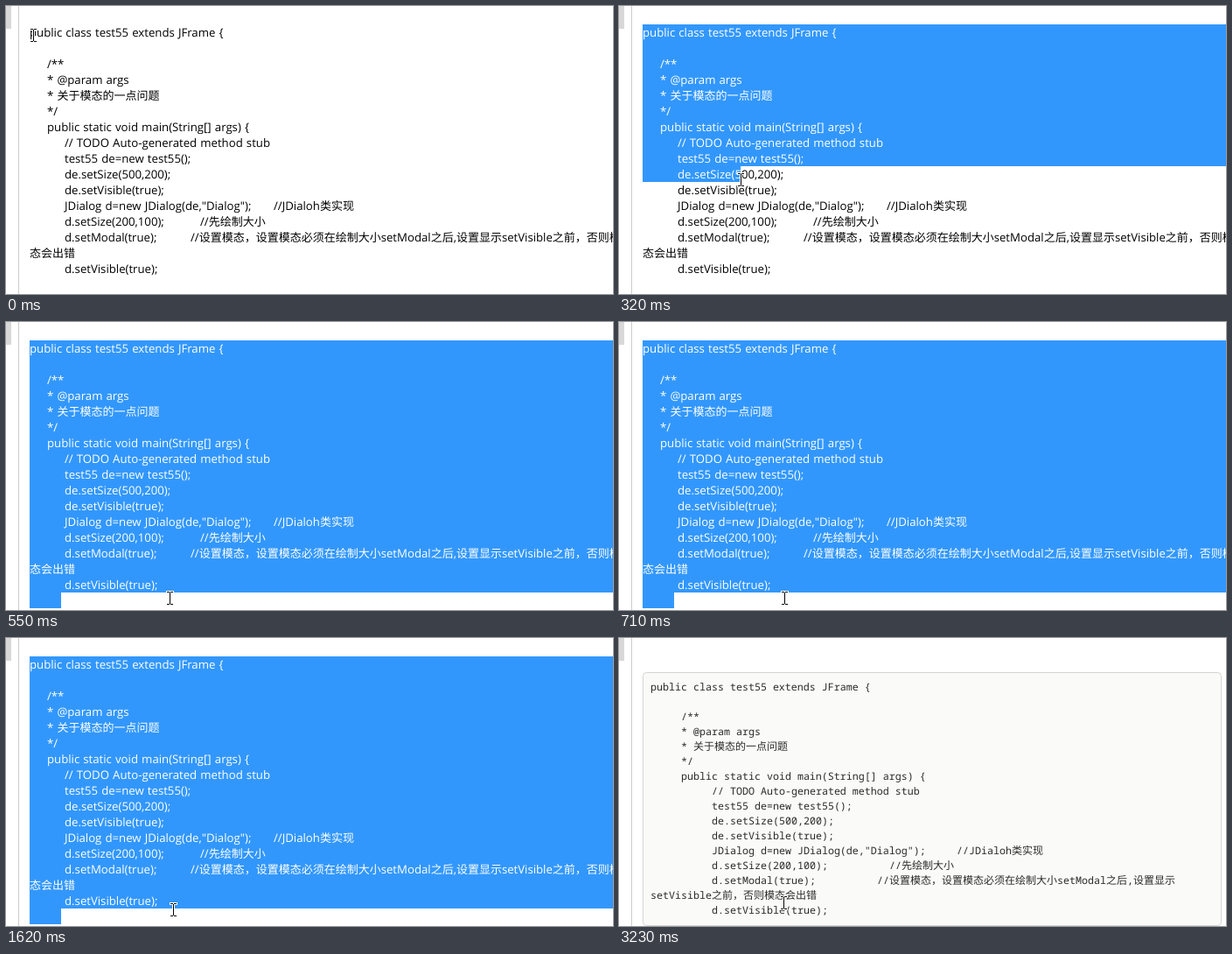
Write an HTML page with a canvas that moves like this. It is 694 px wide and 329 px high and loops after 6.19 s.

```html
<!DOCTYPE html>
<html lang="zh-CN">
<head>
<meta charset="utf-8">
<style>
html, body { margin: 0; width: 100%; height: 100%; overflow: hidden; background: #fff; }
canvas { display: block; }
</style>
</head>
<body>
<canvas width="694" height="329"></canvas>
<script>
const ctx = document.querySelector('canvas').getContext('2d');
const LOOP = 6190, W = 694, H = 329;
const CJK = '"Noto Sans CJK SC", "Noto Sans CJK", sans-serif';

// Two looks of the same listing: article text and code box.
const plain = {
  latin: '13.2px "Open Sans", "Noto Sans", sans-serif', cjk: '13px ' + CJK, gap: '0.7px',
  left: 27, indent: 20, base: 35, pitch: 18, notes: [306, 222, 211]
};
const boxed = {
  latin: '11.667px "Noto Sans Mono", "DejaVu Sans Mono", monospace', cjk: '12px ' + CJK, gap: '0px',
  left: 36, indent: 35, base: 60, pitch: 17, notes: [386, 309, 295]
};

// Each row: indent level, code, index of the comment column, comment.
const listing = (note, rest) => [
  [0, 'public class test55 extends JFrame {'],
  [0, ''],
  [1, '/**'],
  [1, '* @param args'],
  [1, '* 关于模态的一点问题'],
  [1, '*/'],
  [1, 'public static void main(String[] args) {'],
  [2, '// TODO Auto-generated method stub'],
  [2, 'test55 de=new test55();'],
  [2, 'de.setSize(500,200);'],
  [2, 'de.setVisible(true);'],
  [2, 'JDialog d=new JDialog(de,"Dialog");', 0, '//JDialoh类实现'],
  [2, 'd.setSize(200,100);', 1, '//先绘制大小'],
  [2, 'd.setModal(true);', 2, note],
  [0, rest],
  [2, 'd.setVisible(true);']
];
const note = '//设置模态，设置模态必须在绘制大小setModal之后,设置显示';
plain.rows = listing(note + 'setVisible之前，否则模', '态会出错');
boxed.rows = listing(note, 'setVisible之前，否则模态会出错');

// time, pointer x, pointer y, last selected row, selection end x
const steps = [
  [0, 31, 33, 0, 27],
  [150, 38, 48, 1, 27],
  [220, 54, 70, 2, 53],
  [320, 139, 198, 9, 139],
  [400, 165, 255, 13, 164],
  [470, 181, 289, 14, 79],
  [550, 187, 315, 16, 63],
  [630, 188, 315, 16, 63],
  [710, 189, 315, 16, 63],
  [930, 190, 315, 16, 63],
  [1010, 191, 314, 16, 63],
  [1090, 192, 314, 16, 63],
  [1620, 191, 310, 16, 63],
  [1700, 189, 304, 15, 187],
  [1770, 188, 299, 15, 187],
  [3230, 188, 302]
];

function drawText(text, x, y, look) {
  for (const run of text.match(/[\u2e80-\uffef]+|[^\u2e80-\uffef]+/g) || []) {
    ctx.font = run[0] >= '\u2e80' ? look.cjk : look.latin;
    ctx.fillText(run, x, y);
    x += ctx.measureText(run).width;
  }
}

function drawRows(look, color) {
  ctx.fillStyle = color;
  ctx.wordSpacing = look.gap;
  look.rows.forEach(([level, code, column, comment], i) => {
    const y = look.base + look.pitch * i;
    drawText(code, look.left + look.indent * level, y, look);
    if (comment) drawText(comment, look.notes[column], y, look);
  });
}

function drawSelection(row, end) {
  const { left, pitch } = plain, top = 21;
  ctx.save();
  ctx.beginPath();
  ctx.rect(left, top, W - left, pitch * row);
  ctx.rect(left, top + pitch * row, end - left, pitch);
  ctx.clip();
  ctx.fillStyle = '#3297fd';
  ctx.fillRect(0, 0, W, H);
  drawRows(plain, '#fff');
  ctx.restore();
}

function drawPointer(x, y) {
  const bars = [[-3, -7, 3, 1], [1, -7, 3, 1], [0, -6, 1, 13], [-3, 7, 3, 1], [1, 7, 3, 1]];
  ctx.fillStyle = '#fff';
  for (const [dx, dy, w, h] of bars) ctx.fillRect(x + dx - 1, y + dy - 1, w + 2, h + 2);
  ctx.fillStyle = '#000';
  for (const [dx, dy, w, h] of bars) ctx.fillRect(x + dx, y + dy, w, h);
}

function drawBox() {
  ctx.beginPath();
  ctx.roundRect(27.5, 39.5, 661, 289, 4);
  ctx.fillStyle = '#fafaf9';
  ctx.fill();
  ctx.strokeStyle = '#d4d4d4';
  ctx.lineWidth = 1;
  ctx.stroke();
}

function draw(now) {
  const t = now % LOOP;
  const [, x, y, row, end] = steps.findLast(step => step[0] <= t) || steps[0];
  ctx.textRendering = 'geometricPrecision';
  ctx.fillStyle = '#fff';
  ctx.fillRect(0, 0, W, H);
  ctx.fillStyle = '#d8d8d8';
  ctx.fillRect(0, 0, 6, 26);
  ctx.fillStyle = '#ccc';
  ctx.fillRect(14, 0, 1, H);
  if (row === undefined) {
    drawBox();
    drawRows(boxed, '#2b2b2b');
  } else {
    drawRows(plain, '#000');
    drawSelection(row, end);
  }
  drawPointer(x, y);
}

let start;
function tick(now) {
  start ??= now;
  draw(now - start);
  requestAnimationFrame(tick);
}
requestAnimationFrame(tick);
</script>
</body>
</html>
```
